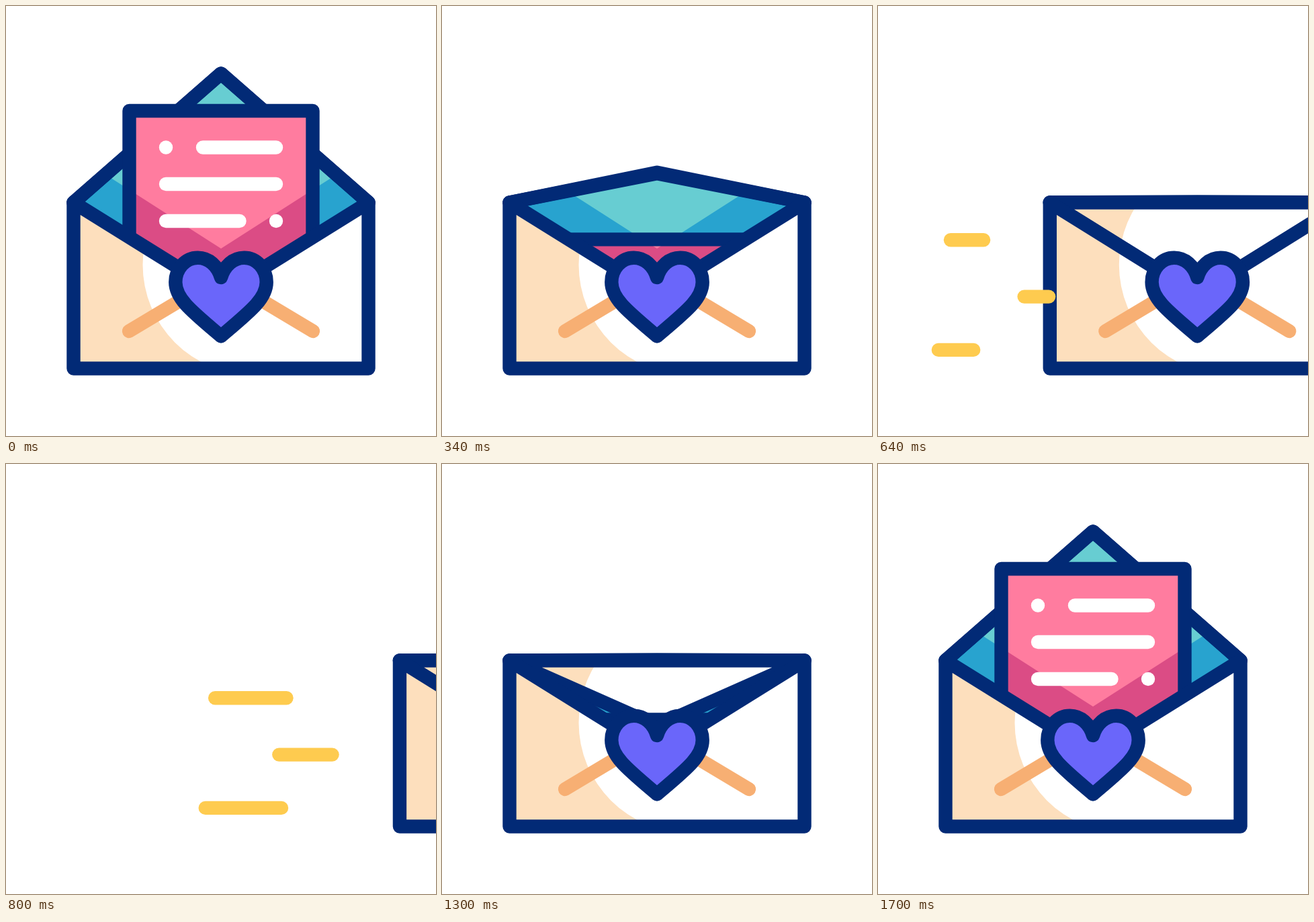
Recreate the animation shown at these times as an HTML page with a canvas. Size 640 by 640 pixels, loop 2.02 s.

```html
<!DOCTYPE html>
<html lang="en">
<head>
<meta charset="utf-8">
<title>Love letter</title>
<style>
html, body { margin: 0; width: 100%; height: 100%; overflow: hidden; background: #fff; }
canvas { display: block; }
</style>
</head>
<body>
<canvas id="stage" width="640" height="640"></canvas>
<script>
const ctx = document.getElementById('stage').getContext('2d');
const LOOP = 2020, STEP = 20, WIDTH = 20.4;
const NAVY = '#022a76', TEAL = '#67cdd2', BLUE = '#28a3cf', PINK = '#ff7c9f', ROSE = '#db4c85';
const CREAM = '#fddfbd', ORANGE = '#f7af73', VIOLET = '#6a66fa', YELLOW = '#fecb4f';
const LEFT = 100.5, RIGHT = 539.5, MID = 320, TOP = 292.5, BOTTOM = 539.5, FOLD = 429;
const TRAVEL = 566, OPEN = 100.5, FLAT = 291.5, DROP = 246;

// Eased progress from t0 to t1: cubic-bezier(.28, 0, .72, 1)
function ease(t, t0, t1) {
  const u = (t - t0) / (t1 - t0);
  if (u <= 0) return 0;
  if (u >= 1) return 1;
  let lo = 0, hi = 1;
  for (let i = 0; i < 24; i++) {
    const s = (lo + hi) / 2, r = 1 - s;
    if (0.84 * s * r * r + 2.16 * s * s * r + s * s * s < u) lo = s; else hi = s;
  }
  return lo * lo * (3 - 2 * lo);
}

// Goes from 0 to 1 while closing and back to 0 while opening
const fold = (t, a, b, c, d) => ease(t, a, b) - ease(t, c, d);

function poly(points, closed = true) {
  const p = new Path2D();
  points.forEach(([x, y], i) => i ? p.lineTo(x, y) : p.moveTo(x, y));
  if (closed) p.closePath();
  return p;
}

function fill(path, color) {
  ctx.fillStyle = color;
  ctx.fill(path);
}

function stroke(path, color) {
  ctx.strokeStyle = color;
  ctx.stroke(path);
}

function line(x1, x2, y, color) {
  stroke(poly([[x1, y], [x2 + 0.01, y]], false), color);
}

function clipped(path, draw) {
  ctx.save();
  ctx.clip(path);
  draw();
  ctx.restore();
}

const shade = poly([[0, 156], [MID, 361], [640, 156], [640, 640], [0, 640]]);
const front = poly([[LEFT, TOP], [LEFT, BOTTOM], [RIGHT, BOTTOM], [RIGHT, TOP], [MID, FOLD]]);
const mouth = poly([[LEFT, 0], [RIGHT, 0], [RIGHT, TOP], [MID, FOLD], [LEFT, TOP]]);
const seams = poly([[183, 484], [MID, 402], [457, 484]], false);
const heart = new Path2D(
  'M320 404C315 387 302 374.7 285.5 374.7C267 374.7 252.3 391 252.3 411' +
  'C252.3 436 277 455 320 491.5C363 455 387.7 436 387.7 411' +
  'C387.7 391 373 374.7 354.5 374.7C338 374.7 325 387 320 404Z');
const glow = new Path2D();
glow.rect(0, 0, 640, 640);
glow.arc(367.5, 385, 164, 0, Math.PI * 2);

function whitePanel(path) {
  fill(path, '#fff');
  clipped(path, () => {
    ctx.beginPath();
    ctx.rect(0, 0, 368, 640);
    ctx.clip();
    ctx.fillStyle = CREAM;
    ctx.fill(glow, 'evenodd');
  });
}

function drawFlap(lining, flap) {
  const peak = Math.min(lining, flap);
  const inside = poly([[LEFT, TOP], [MID, peak], [RIGHT, TOP], [MID, FOLD]]);
  fill(inside, TEAL);
  clipped(inside, () => fill(shade, BLUE));
  stroke(poly([[LEFT, TOP], [MID, lining], [RIGHT, TOP]], false), NAVY);
  const down = flap > TOP;
  const edge = poly([[LEFT, TOP], [MID, flap], [RIGHT, TOP]], down);
  if (down) whitePanel(edge);
  stroke(edge, NAVY);
}

function drawLetter(dy) {
  const sheet = poly([[183.5, 156 + dy], [456.5, 156 + dy], [456.5, 700], [183.5, 700]]);
  clipped(mouth, () => {
    fill(sheet, PINK);
    clipped(sheet, () => fill(shade, ROSE));
    line(238, 238, 210.5 + dy, '#fff');
    line(293, 402, 210.5 + dy, '#fff');
    line(238, 402, 265 + dy, '#fff');
    line(238, 347.5, 320 + dy, '#fff');
    line(402, 402, 320 + dy, '#fff');
    stroke(sheet, NAVY);
  });
}

function drawEnvelope(t) {
  const lining = OPEN + (FLAT - OPEN) * fold(t, 155, 416, 1360, 1620);
  const flap = OPEN + (FOLD - OPEN) * fold(t, 155, 555, 1220, 1620);
  const shift = t < 910 ? TRAVEL * ease(t, 520, 880) : TRAVEL * (ease(t, 940, 1300) - 1);
  ctx.save();
  ctx.translate(shift, 0);
  drawFlap(lining, flap);
  drawLetter(DROP * fold(t, 0, 480, 1220, 1700));
  whitePanel(front);
  stroke(seams, ORANGE);
  stroke(front, NAVY);
  fill(heart, VIOLET);
  stroke(heart, NAVY);
  ctx.restore();
}

function drawTrails(t) {
  const head = ease(t, 550, 800), tail = ease(t, 614, 1085);
  if (head - tail < 0.004) return;
  const drift = 251 * ease(t, 520, 880);
  for (const [x, len, y] of [[37.2, 165, 348.3], [147.3, 123, 432.6], [19, 175.7, 511.9]]) {
    line(x + drift + len * tail, x + drift + len * head, y, YELLOW);
  }
}

function frame(now) {
  const t = Math.floor(now % LOOP / STEP) * STEP;
  ctx.fillStyle = '#fff';
  ctx.fillRect(0, 0, 640, 640);
  ctx.lineWidth = WIDTH;
  ctx.lineCap = ctx.lineJoin = 'round';
  drawEnvelope(t);
  drawTrails(t);
}

let start;
function tick(now) {
  if (start === undefined) start = now;
  frame(now - start);
  requestAnimationFrame(tick);
}
frame(0);
requestAnimationFrame(tick);
</script>
</body>
</html>
```
